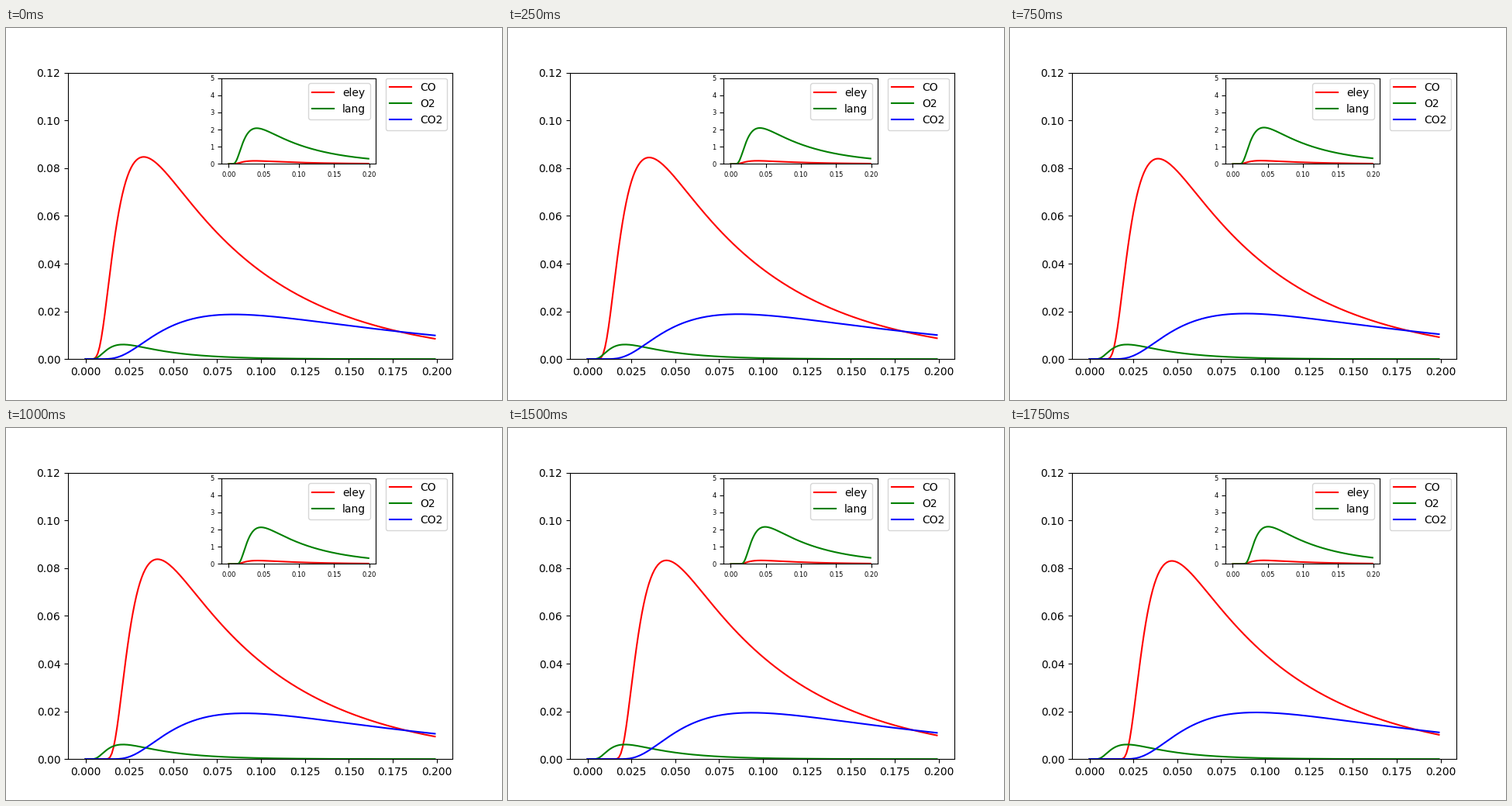
Animation of 640 by 480 pixels, one loop 2 s. Source, as a matplotlib script:

```python
import numpy as np
import matplotlib.pyplot as plt
from matplotlib.animation import FuncAnimation

W, H, DPI = 640, 480, 100
STEPS = 8
DELAY = 0.002  # extra lag of the CO pulse per step

t = np.arange(200) * 0.001
dense = np.linspace(1e-4, 0.2, 4000)


def diffusion(s, d, k):
    """Exit flow of a pulse diffusing at rate d with first-order loss k."""
    s = np.maximum(s, 1e-6)
    tau = d * s
    series = sum((-1) ** n * (2 * n + 1) * np.exp(-(2 * n + 1) ** 2 / (4 * tau))
                 for n in range(6))
    return tau ** -1.5 * series * np.exp(-k * s)


def product(s, p, q, r):
    """Slow product response: sharp onset, power law, exponential tail."""
    s = np.maximum(s, 1e-6)
    return s ** -p * np.exp(-q / s - r * s)


def pulse(shape, s, peak, *args):
    """Scale a response so that its maximum equals peak."""
    return peak * shape(s, *args) / shape(dense, *args).max()


def co(n):
    s = np.maximum(t - DELAY * n, 0)
    loss = np.exp(-0.0039 * n * np.tanh(s / 0.035))
    return pulse(diffusion, s, 0.0847, 4.7, 3.15) * loss


def o2(n):
    return pulse(diffusion, t, 0.0061, 5.83, 23.6)


def co2(n):
    return pulse(product, t - 0.0015 * n, 0.0187 + 0.00012 * n, 0.8, 0.112, 6.22)


def eley(n):
    return pulse(diffusion, t - 0.001 * n, 0.18 + 0.0043 * n, 4.0, 5.0)


def lang(n):
    return pulse(diffusion, t - 0.0015 * n, 2.08 + 0.0128 * n, 3.8, 3.7)


fig = plt.figure(figsize=(W / DPI, H / DPI), dpi=DPI)
ax = fig.add_axes([0.125, 0.11, 0.775, 0.77])
inset = fig.add_axes([278.4 / W, 304.58 / H, 198.4 / W, 110.88 / H])

curves = []
for axes, fn, color, label in [
    (ax, co, "red", "CO"),
    (ax, o2, "green", "O2"),
    (ax, co2, "blue", "CO2"),
    (inset, eley, "red", "eley"),
    (inset, lang, "green", "lang"),
]:
    line, = axes.plot(t, fn(0), color=color, label=label)
    curves.append((line, fn))

pad = 0.05 * t[-1]
for axes, top in [(ax, 0.12), (inset, 5)]:
    axes.set_xlim(-pad, t[-1] + pad)
    axes.set_ylim(0, top)
    axes.legend(loc="upper right")

ax.set_xticks(np.arange(9) * 0.025)
ax.set_yticks(np.arange(7) * 0.02)
inset.set_xticks(np.arange(5) * 0.05)
inset.set_yticks(range(6))
inset.tick_params(labelsize=6)


def update(n):
    for line, fn in curves:
        line.set_ydata(fn(n))
    return [line for line, _ in curves]


anim = FuncAnimation(fig, update, frames=STEPS, interval=2000 / STEPS,
                     repeat=True, repeat_delay=0)
plt.show()
```
